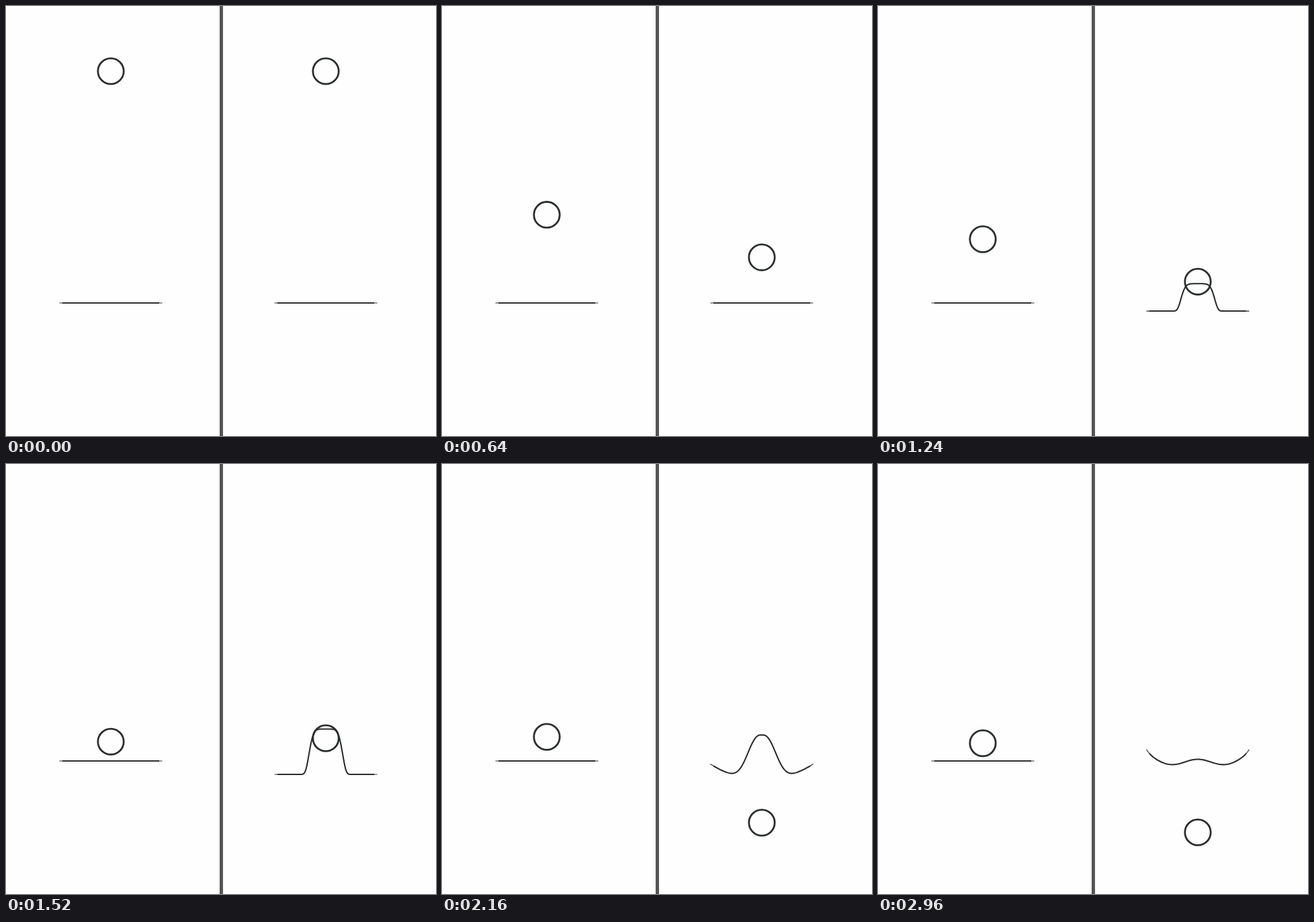
An HTML page with a canvas that plays this animation: 640x640 px, repeating every 3000 ms.

```html
<!DOCTYPE html>
<html>
<head>
<meta charset="utf-8">
<style>
html, body { margin: 0; width: 100%; height: 100%; overflow: hidden; background: #fefefe; }
canvas { display: block; width: 640px; height: 640px; }
</style>
</head>
<body>
<canvas id="stage" width="640" height="640"></canvas>
<script>
const ctx = document.getElementById('stage').getContext('2d');
const { exp, cos, cosh, log, max, min, PI } = Math;
const STEP = 40, STEPS = 75;
const TOP = 97, REST = 420.4, FLOOR = 577.8, BAR = 442, HALF = 76.5, G = 0.962;

// Height of a throw that leaves the ground at a and lands at b.
const hop = (t, a, b, g = G) => g * (t - a) * (b - t);

// Left ball: fall with air drag, then shrinking bounces on the bar.
function leftY(t) {
  let a = 20.75, span = 17.68;
  if (t < a) return min(REST, TOP - 0.35 + 325 * log(cosh((t + 0.6) / 13)));
  while (t >= a + span) {
    a += span;
    span = max(span * 0.66, 4.8);
  }
  return REST - hop(t, a, a + span);
}

// Right ball: breaks through the band, rebounds off an unseen floor, lifts the band.
function rightY(t) {
  const crest = 404.3;
  if (t <= 16) return TOP + G * t * (t + 2);
  if (t < 22.3) return 374 + (t - 16) * 32.3;
  if (t < 28) return FLOOR - (t - 22.3) * (29.3 - G * (t - 22.3));
  if (t < 36) return crest + 37.4 * ((36 - t) / 8) ** 3.9;
  if (t < 49.4) return crest + G * (t - 36) ** 2;
  if (t < 68.2) return FLOOR - hop(t, 49.4, 68.2, 0.673);
  return FLOOR - hop(t, 68.2, 79.3);
}

// Band profiles: offset from the bar at distance d from the middle.
const flat = () => 0;
const spike = d => -10.5 + 48.5 * exp(-d / 13.8);
const hat = d => 20 - 67.5 * exp(-((d / 26) ** 6));
const bowl = d => 16.5 - 53 * (d / HALF) ** 2.7;
const hump = d => 22.5 - 0.145 * d - 58 * exp(-((d / 26) ** 2.4));
const wave = d => 1.5 - 4 * cos(2 * PI * d / HALF) - 14.5 * (d / HALF) ** 8;
const scaled = (shape, k) => d => k * shape(d);

const poses = [
  [0, flat], [17, flat], [21, scaled(spike, 1.3)], [24, spike],
  [28, scaled(hat, 0.5)], [38, hat], [46, bowl],
  [58, scaled(hump, 1.6)], [63, hump], [74, wave]
];

function bandAt(t) {
  const i = max(1, poses.findIndex(p => p[0] >= t));
  const [t0, a] = poses[i - 1], [t1, b] = poses[i];
  const u = (1 - cos(PI * (t - t0) / (t1 - t0))) / 2;
  return d => a(d) + (b(d) - a(d)) * u;
}

function line(x, shape, half, width) {
  ctx.beginPath();
  for (let d = -half; d <= half; d++) ctx.lineTo(x + d, BAR + shape(Math.abs(d)));
  ctx.lineWidth = width;
  ctx.stroke();
}

// A line that thins out at both ends.
function band(x, shape) {
  line(x, shape, HALF, 1.2);
  line(x, shape, HALF - 4.5, 2);
}

function ball(x, y) {
  ctx.beginPath();
  ctx.arc(x, y, 19.2, 0, PI * 2);
  ctx.lineWidth = 2.8;
  ctx.stroke();
}

function draw(t) {
  ctx.fillStyle = '#fefefe';
  ctx.fillRect(0, 0, 640, 640);
  ctx.fillStyle = '#555555';
  ctx.fillRect(318, 0, 5, 640);
  ctx.strokeStyle = '#2b2e2f';
  ctx.lineJoin = 'round';
  band(156, flat);
  ball(156, leftY(t));
  band(476, bandAt(t));
  ball(476, rightY(t));
}

const start = performance.now();
function tick() {
  draw(Math.floor((performance.now() - start) / STEP) % STEPS);
  requestAnimationFrame(tick);
}
tick();
</script>
</body>
</html>
```
